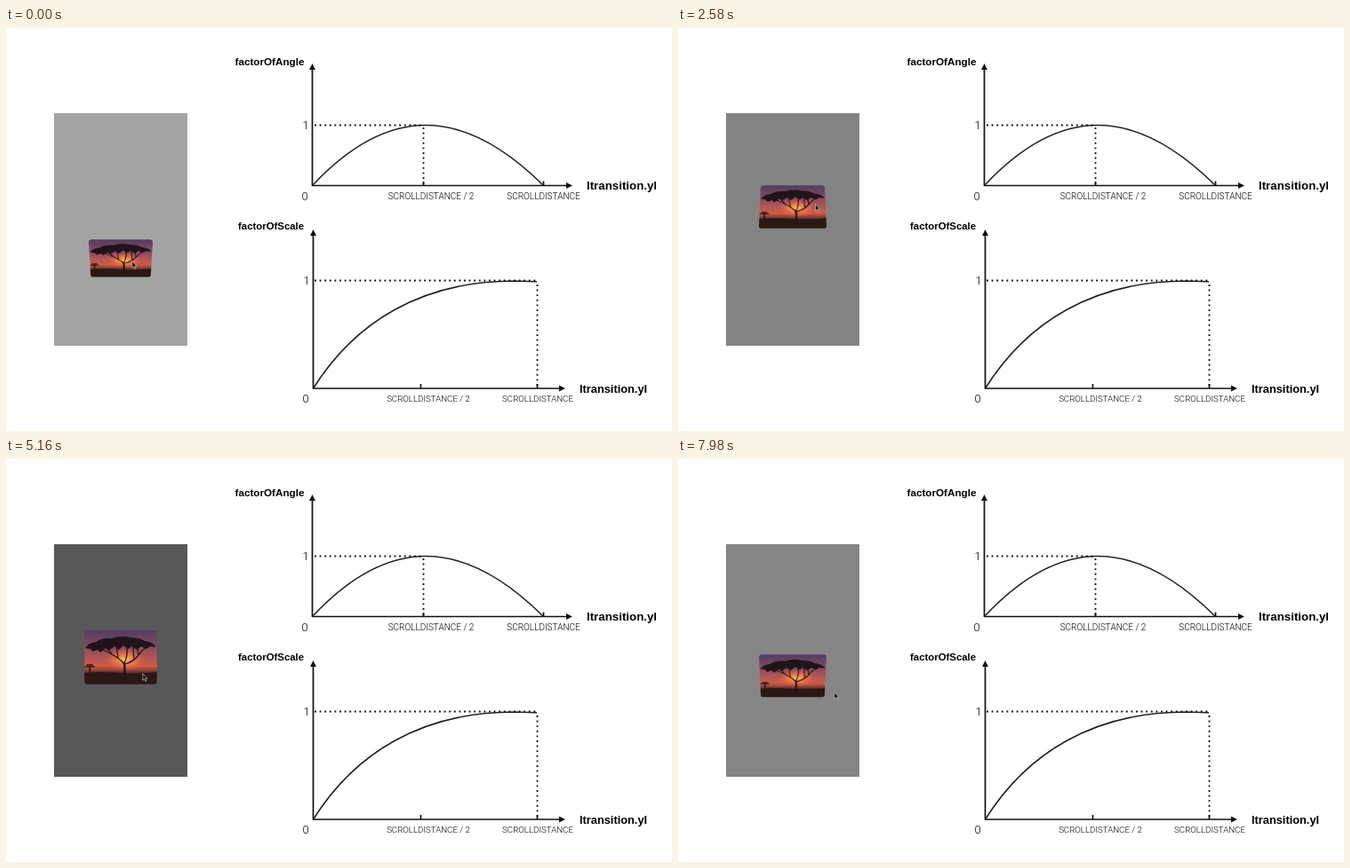
Recreate the animation shown at these times as an HTML page. Size 749 px wide and 454 px high, loop 8000 ms.

```html
<!DOCTYPE html>
<html lang="en">
<head>
<meta charset="utf-8">
<title>Drag to dismiss</title>
<style>
  html, body { margin: 0; width: 100%; height: 100%; overflow: hidden; background: #fff; }
  svg { position: absolute; left: 0; top: 0; }
  #screen { position: absolute; left: 54px; top: 96px; width: 150px; height: 262px; }
  #card { left: 88px; top: 191.5px; border-radius: 4px; overflow: hidden; }
  .title { font: bold 11.7px "Liberation Sans", Arial, sans-serif; fill: #000; }
  .label { font: 300 10px Roboto, sans-serif; fill: #000; text-anchor: middle; }
  .digit { font: 300 13px Roboto, sans-serif; fill: #000; text-anchor: middle; }
  .line { fill: none; stroke: #111; stroke-width: 1.7; }
  .curve { fill: none; stroke: #222; stroke-width: 1.6; }
  .dots { fill: none; stroke: #111; stroke-width: 1.8; stroke-dasharray: 1.9 3.7; }
  .head { fill: #111; }
</style>
</head>
<body>
<svg width="749" height="454">
  <g>
    <path class="line" d="M344.5 45V177.5H632M604.5 177.5v-5M469.5 177.5v-4"/>
    <path class="head" d="M344.5 40l3.5 7h-7zM637 177.5l-7-3.5v7z"/>
    <path class="dots" d="M347 109.5H470M469.5 112V176"/>
    <path class="curve" d="M344.5 177.5Q408 109.5 472 109.5Q536 109.5 604 177"/>
    <text class="title" x="257.5" y="41.5">factorOfAngle</text>
    <text class="title" x="653" y="182" style="font-size:13.3px">ltransition.yl</text>
    <text class="digit" x="337" y="114">1</text>
    <text class="digit" x="336" y="194">0</text>
    <text class="label" x="478" y="192.5">SCROLLDISTANCE / 2</text>
    <text class="label" x="604.5" y="192.5">SCROLLDISTANCE</text>
  </g>
  <g>
    <path class="line" d="M345.5 232V406H624M466.5 406v-5M597.5 406v-5"/>
    <path class="head" d="M345.5 227l3.5 7h-7zM629 406l-7-3.5v7z"/>
    <path class="dots" d="M347 284.5H598M597.5 289V404"/>
    <path class="curve" d="M345.5 406C392 332 466 285 572 285L597 285.8"/>
    <text class="title" x="261" y="227" style="font-size:11.4px">factorOfScale</text>
    <text class="title" x="645" y="411" style="font-size:12.8px">ltransition.yl</text>
    <text class="digit" x="338" y="289">1</text>
    <text class="digit" x="337" y="422">0</text>
    <text class="label" x="475" y="420.5" style="font-size:9.7px">SCROLLDISTANCE / 2</text>
    <text class="label" x="598" y="420.5" style="font-size:9.7px">SCROLLDISTANCE</text>
  </g>
</svg>

<div id="screen"></div>

<svg id="card" width="82" height="61" viewBox="0 0 82 61">
  <defs>
    <linearGradient id="sky" x2="0" y2="1">
      <stop offset="0" stop-color="#533b60"/>
      <stop offset=".25" stop-color="#7c4763"/>
      <stop offset=".5" stop-color="#b05557"/>
      <stop offset=".66" stop-color="#cf5c42"/>
      <stop offset=".74" stop-color="#8f4138"/>
      <stop offset=".8" stop-color="#4a2723"/>
      <stop offset="1" stop-color="#24150f"/>
    </linearGradient>
    <radialGradient id="glow">
      <stop offset="0" stop-color="#ffdc80"/>
      <stop offset=".2" stop-color="#ff9c4c"/>
      <stop offset="1" stop-color="#f0603c" stop-opacity="0"/>
    </radialGradient>
  </defs>
  <rect width="82" height="61" fill="url(#sky)"/>
  <ellipse cx="46" cy="33" rx="23" ry="13" fill="url(#glow)"/>
  <path fill="#2a1815" d="M0 48Q20 46 40 48T82 47V61H0z"/>
  <path fill="#1f1419" d="M1 20Q4 14 13 13Q20 8 31 9Q42 5 52 8Q62 8 68 12Q78 13 81 19
    L74 18L70 21L64 18L59 22L54 18L49 21L44 17L39 22L34 18L27 23L24 20L18 25L15 22L9 24L7 21z"/>
  <g fill="none" stroke="#1f1419" stroke-linecap="round">
    <path stroke-width="2.4" d="M45 55Q46 44 45 37"/>
    <path stroke-width="1.3" d="M45 38Q39 30 21 22M45 37Q49 29 48 19M46 38Q56 35 61 28T72 18M38 30L36 18M56 33L55 19M31 27L27 21M61 28L60 20"/>
    <path stroke-width="1.6" d="M1 41H11M3 39H9M6 41V48"/>
  </g>
</svg>

<svg id="cursor" width="9" height="12">
  <path d="M.8.8V8.3L2.5 6.8L3.9 9.6L5 9L3.7 6.3H6z" fill="#0b0b0b" stroke="#ddd" stroke-width=".6"/>
</svg>

<script>
const LOOP = 8000, STEP = 30;
const HOME_Y = 222, SCROLL_DISTANCE = 81.5;
const MIN_SCALE = 0.79, MAX_ANGLE = 36;

// time, card centre y, cursor tip x, cursor tip y
const KEYS = [
  [0, 259.5, 141, 262],
  [1050, 227.5, 144, 222],
  [1920, 140.5, 151, 136],
  [3300, 268.5, 155, 268],
  [5160, 223, 153, 241],
  [6330, 136, 172, 151],
  [7980, 244.5, 175, 262]
];
const screenBox = document.getElementById('screen');
const card = document.getElementById('card');
const cursor = document.getElementById('cursor');

const slope = (i, col) => (KEYS[i + 1][col] - KEYS[i][col]) / (KEYS[i + 1][0] - KEYS[i][0]);

// Harmonic mean keeps the path monotone; it rests where the direction turns.
function tangent(i, col) {
  if (i === 0) return slope(0, col);
  if (i === KEYS.length - 1) return slope(i - 1, col);
  const a = slope(i - 1, col), b = slope(i, col);
  return a * b > 0 ? 2 * a * b / (a + b) : 0;
}

function valueAt(time, col) {
  let i = 0;
  while (i < KEYS.length - 2 && time >= KEYS[i + 1][0]) i++;
  const start = KEYS[i], end = KEYS[i + 1], span = end[0] - start[0];
  const u = Math.min(1, (time - start[0]) / span), v = 1 - u;
  return start[col] * (1 + 2 * u) * v * v + end[col] * u * u * (1 + 2 * v)
    + span * u * v * (tangent(i, col) * v - tangent(i + 1, col) * u);
}

function render(time) {
  const shift = valueAt(time, 1) - HOME_Y;
  const progress = Math.min(1, Math.abs(shift) / SCROLL_DISTANCE);
  const factorOfAngle = 4 * progress * (1 - progress);
  const factorOfScale = 1 - (1 - progress) ** 2;
  const angle = -Math.sign(shift) * MAX_ANGLE * factorOfAngle;
  const scale = 1 - (1 - MIN_SCALE) * factorOfScale;
  const gray = Math.round(86 + 169 * progress);

  screenBox.style.background = `rgb(${gray},${gray},${gray})`;
  card.style.transform =
    `translateY(${shift}px) perspective(450px) rotateX(${angle}deg) scale(${scale})`;
  cursor.style.transform = `translate(${valueAt(time, 2)}px, ${valueAt(time, 3)}px)`;
}

function tick() {
  const time = performance.now() % LOOP;
  render(Math.floor(time / STEP) * STEP);
  requestAnimationFrame(tick);
}
tick();
</script>
</body>
</html>
```
